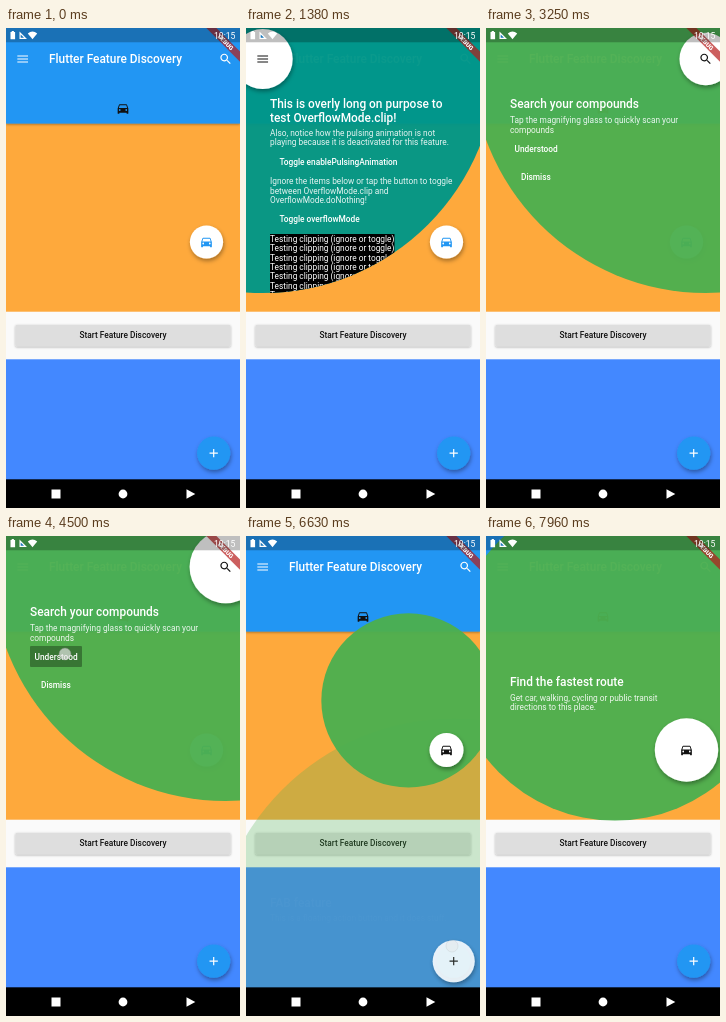
An HTML page for the animation above (8 s loop, 234 px wide and 480 px high).

```html
<!DOCTYPE html>
<html lang="en">
<head>
<meta charset="utf-8">
<title>Feature discovery</title>
<style>
html, body { margin: 0; width: 100%; height: 100%; overflow: hidden; background: #000; }
svg { display: block; width: 100vw; height: 100vh; }
text { font: 400 8.33px Roboto, sans-serif; white-space: pre; }
.title { font-size: 11.9px; font-weight: 500; }
.button { font-weight: 500; }
.body { fill-opacity: .9; }
</style>
</head>
<body>
<svg id="stage" viewBox="0 0 234 480">
  <defs>
    <filter id="low" x="-10%" y="-30%" width="120%" height="180%">
      <feDropShadow dx="0" dy=".9" stdDeviation=".8" flood-opacity=".34"/>
    </filter>
    <filter id="high" x="-40%" y="-40%" width="180%" height="200%">
      <feDropShadow dx=".8" dy="2.4" stdDeviation="2.2" flood-opacity=".36"/>
    </filter>
    <clipPath id="screen"><rect width="234" height="451.6"/></clipPath>
  </defs>
  <g clip-path="url(#screen)">
    <g id="page"></g>
    <g id="overlays"></g>
    <g id="banner"></g>
    <circle id="touch" r="6" fill="#e4e4e4" stroke="#999" stroke-width=".5"/>
  </g>
  <g id="system"></g>
</svg>
<script>
const LOOP = 8000, MOVE = 250, SETTLE = 30, PULSE = 1000;
const WIDTH = 234, DP = 0.595;
const $ = id => document.getElementById(id);

const GLYPHS = {
  menu: 'M3 18h18v-2H3v2zm0-5h18v-2H3v2zm0-7v2h18V6H3z',
  search: 'M15.5 14h-.79l-.28-.27C15.41 12.59 16 11.11 16 9.5 16 5.91 13.09 3 9.5 3S3 5.91 3 9.5 5.91 16 9.5 16c1.61 0 3.09-.59 4.23-1.57l.27.28v.79l5 4.99L20.49 19l-4.99-5zm-6 0C7.01 14 5 11.99 5 9.5S7.01 5 9.5 5 14 7.01 14 9.5 11.99 14 9.5 14z',
  plus: 'M19 13h-6v6h-2v-6H5v-2h6V5h2v6h6v2z',
  car: 'M18.92 6.01C18.72 5.42 18.16 5 17.5 5h-11c-.66 0-1.21.42-1.42 1.01L3 12v8c0 .55.45 1 1 1h1c.55 0 1-.45 1-1v-1h12v1c0 .55.45 1 1 1h1c.55 0 1-.45 1-1v-8zM6.5 16a1.5 1.5 0 1 1 0-3 1.5 1.5 0 0 1 0 3zm11 0a1.5 1.5 0 1 1 0-3 1.5 1.5 0 0 1 0 3zM5 11l1.5-4.5h11L19 11z'
};

const icon = (name, x, y, fill) =>
  `<path d="${GLYPHS[name]}" fill="${fill}" transform="translate(${x} ${y}) scale(${DP}) translate(-12 -12)"/>`;
const rect = (x, y, w, h, fill, more = '') =>
  `<rect x="${x}" y="${y}" width="${w}" height="${h}" fill="${fill}" ${more}/>`;
const disc = (x, y, r, fill, more = '') =>
  `<circle cx="${x}" cy="${y}" r="${r}" fill="${fill}" ${more}/>`;
const text = (kind, x, y, str, fill = '#fff', more = '') =>
  `<text class="${kind}" x="${x}" y="${y}" fill="${fill}" ${more}>${str}</text>`;
const lines = (kind, x, y, step, list) =>
  list.map((str, i) => text(kind, x, y + i * step, str)).join('');
const heading = (y, ...list) => lines('title', 24, y, 13.9, list);
const para = (y, ...list) => lines('body', 24, y, 9.35, list);

$('page').innerHTML =
  rect(0, 283, 234, 49, '#fafafa') +
  rect(0, 95, 234, 188.7, '#fea93c') +
  rect(0, 331.3, 234, 121, '#4388ff') +
  rect(0, 0, 234, 95.6, '#2196f3', 'filter="url(#low)"') +
  icon('menu', 16.7, 31, '#fff') +
  text('title', 43, 35, 'Flutter Feature Discovery') +
  icon('search', 219.7, 31, '#fff') +
  icon('car', 117, 80.5, '#111') +
  rect(9.5, 296.8, 215, 21.4, '#dedede', 'rx="1.2" filter="url(#low)"') +
  text('button', 117, 310, 'Start Feature Discovery', '#111', 'text-anchor="middle"') +
  disc(200.5, 214, 16.6, '#fff', 'filter="url(#high)"') + icon('car', 200.5, 214, '#2196f3') +
  disc(207.7, 425.2, 16.6, '#2196f3', 'filter="url(#high)"') + icon('plus', 207.7, 425.2, '#fff');

$('banner').innerHTML =
  '<g transform="translate(234 0) rotate(45)">' +
  rect(-40 * DP, 28 * DP, 80 * DP, 12 * DP, '#b71c1c', 'opacity=".7"') +
  text('', 0, 22.4, 'DEBUG', '#fff', 'text-anchor="middle" style="font-size:6.07px;font-weight:900"') +
  '</g>';

$('system').innerHTML =
  rect(0, 0, 234, 24 * DP, '#000', 'opacity=".25"') +
  '<path d="M4.5 4h1.2V3h2.2v1h1.2v7.2H4.5zM13.5 3.5v7.5H21z" fill="#fff"/>' +
  '<path d="M14.7 6.5v3.3H18z" fill="#1976ba"/>' +
  '<path d="M21.8 5.4Q26.5 1.8 31.2 5.4L26.5 11.2z" fill="#fff"/>' +
  text('', 208, 10.5, '10:15', '#fff', 'style="font-size:8.6px"') +
  rect(0, 451.6, 234, 28.4, '#000') + rect(45.5, 461.5, 9, 9, '#fff') +
  disc(117, 466, 4.4, '#fff') + '<path d="M180.5 461.2v9.6l8.8-4.8z" fill="#fff"/>';

const clipped = Array(8).fill('Testing clipping (ignore or toggle)');

const features = [
  {
    open: 1005, close: 2970, x: 16.7, y: 31, icon: 'menu', fill: '#009688',
    content: heading(80, 'This is overly long on purpose to', 'test OverflowMode.clip!') +
      para(107.5, 'Also, notice how the pulsing animation is not', 'playing because it is deactivated for this feature.') +
      text('button', 33.5, 137, 'Toggle enablePulsingAnimation') +
      para(156.3, 'Ignore the items below or tap the button to toggle', 'between OverflowMode.clip and', 'OverflowMode.doNothing!') +
      text('button', 33.5, 194, 'Toggle overflowMode') +
      rect(24, 206, 124.5, 75, '#000') + lines('', 24, 213.8, 9.35, clipped)
  },
  {
    open: 2970, close: 5090, x: 219.7, y: 31, icon: 'search', fill: '#4caf50',
    content: heading(80, 'Search your compounds') +
      para(95.4, 'Tap the magnifying glass to quickly scan your', 'compounds') +
      rect(24, 110, 52, 21, '#000', 'id="press" rx="1" opacity="0"') +
      text('button', 28.5, 123.6, 'Understood') + text('button', 35, 152, 'Dismiss')
  },
  {
    open: 5090, close: 6541, x: 207.7, y: 425.2, icon: 'plus', fill: '#4caf50',
    content: heading(370.5, 'FAB feature') +
      para(385.3, 'This is a floating action button and it does stuff.')
  },
  {
    open: 6541, close: 9e9, x: 200.5, y: 214, icon: 'car', fill: '#4caf50',
    end: { x: WIDTH / 2 + 20 * DP, y: 214 - WIDTH / 2 + 40 * DP }, size: 0.7,
    content: heading(150, 'Find the fastest route') +
      para(164.5, 'Get car, walking, cycling or public transit', 'directions to this place.')
  }
];

$('overlays').innerHTML = features.map((f, i) =>
  `<g id="f${i}"><clipPath id="clip${i}"><circle/></clipPath>` +
  `<circle class="back" fill="${f.fill}"/>` +
  `<g clip-path="url(#clip${i})"><g class="content">${f.content}</g></g>` +
  disc(f.x, f.y, 0, '#fff', 'class="ring"') +
  '<g class="target">' + disc(f.x, f.y, 0, '#fff', 'class="spot" filter="url(#high)"') +
  icon(f.icon, f.x, f.y, '#111') + '</g></g>').join('');

features.forEach((f, i) => {
  f.el = $('f' + i);
  f.clip = f.el.querySelector('clipPath circle');
  for (const part of ['back', 'content', 'ring', 'target', 'spot'])
    f[part] = f.el.querySelector('.' + part);
});

const clamp = v => Math.min(1, Math.max(0, v));
const easeOut = v => 1 - (1 - v) ** 1.7;
const span = (v, from, to) => easeOut(clamp((v - from) / (to - from)));
const set = (el, attrs) => { for (const k in attrs) el.setAttribute(k, attrs[k]); };

function drawFeature(f, t) {
  const shown = t >= f.open && t < f.close + MOVE;
  f.el.style.display = shown ? '' : 'none';
  if (!shown) return;

  const raw = clamp((t - f.open) / MOVE);
  const p = easeOut(raw);
  const out = clamp((t - f.close) / MOVE);
  const end = f.end || f;
  const circle = {
    cx: f.x + (end.x - f.x) * p,
    cy: f.y + (end.y - f.y) * p,
    r: WIDTH * (f.size || 1) * p + 40 * DP * out
  };
  set(f.back, { ...circle, opacity: 0.96 * span(raw, 0, 0.3) * (1 - span(out, 0.1, 0.6)) });
  set(f.clip, circle);
  set(f.content, { opacity: span(raw, 0.6, 1) * (1 - span(out, 0, 0.4)) });

  const age = t - f.open - MOVE - SETTLE;
  const phase = (age % PULSE) / PULSE;
  const pulsing = age >= 0 && out === 0;
  const wave = (phase - 0.3) / 0.5;
  const grow = !pulsing ? 0 : phase < 0.3 ? phase / 0.3 : Math.max(0, 1 - wave);
  const ringOn = pulsing && wave >= 0 && wave <= 1;
  set(f.ring, { r: ringOn ? (44 + 35 * wave) * DP : 0, opacity: ringOn ? 0.75 * (1 - wave) : 0 });
  set(f.spot, { r: (20 + 24 * (raw - out) + 20 * grow) * DP });
  set(f.target, { opacity: 1 - out * out });
}

const taps = [
  { x: 59, y: 118, from: 4400, to: 5060 },
  { x: 206, y: 410, from: 6380, to: 6540 }
];

function draw(t) {
  features.forEach(f => drawFeature(f, t));
  const tap = taps.find(a => t >= a.from && t < a.to + 180);
  const level = tap ? clamp((t - tap.from) / 60) * clamp(1 - (t - tap.to) / 180) : 0;
  set($('touch'), { cx: tap ? tap.x : 0, cy: tap ? tap.y : 0, opacity: 0.7 * level });
  set($('press'), { opacity: tap === taps[0] ? 0.33 * level : 0 });
}

const start = performance.now();
function tick() {
  draw((performance.now() - start) % LOOP);
  requestAnimationFrame(tick);
}
tick();
</script>
</body>
</html>
```
